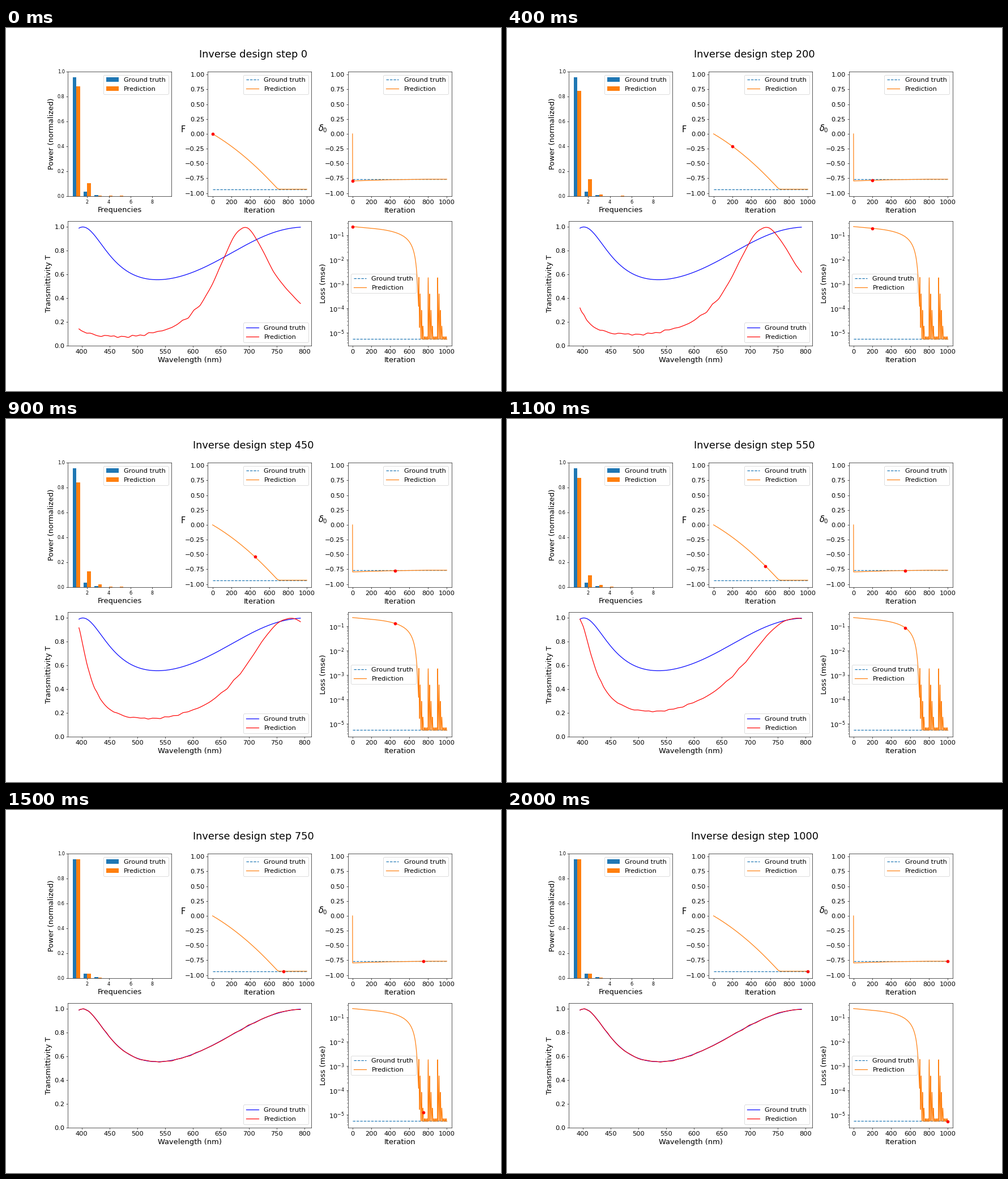
Recreate the animation shown at these times as a matplotlib script. Size 874x641 px, loop 2100 ms.

```python
import numpy as np
import matplotlib.pyplot as plt
from matplotlib.animation import FuncAnimation

DPI = 58.25
W, H = 874, 641
STEP = 50
F_TRUE, D_TRUE, L_TRUE = -0.9333, -0.765, 804
FLOOR = -5.29

wave = np.linspace(395, 793, 200)
freqs = np.arange(1, 10)
iters = np.arange(1001)

# Small model ripple, tied to the optical phase
phase = np.arange(.85, 2.08, .02)
ripple = np.random.default_rng(4).normal(0, .006, phase.size)


def finesse(s):
    """Accelerating descent that settles softly on the true value."""
    u = s / 1000
    f = -(.929 * u + .603 * u ** 2)
    return F_TRUE + .012 * np.logaddexp(0, (f - F_TRUE) / .012)


def length(s):
    return np.interp(s, [0, 200, 350, 450, 650, 720],
                     [692, 728, 764, 774, 792, L_TRUE])


def delta(s):
    return D_TRUE + (length(s) - L_TRUE) / 3900


def airy(f, l):
    return 1 / (1 + 12 * (1 + f) * np.sin(np.pi * l / wave) ** 2)


def predict(s):
    f, l = finesse(s), length(s)
    wobble = np.interp(l / wave, phase, ripple)
    return airy(f, l) + (.35 + .65 * (1 + f)) * wobble


def power(t):
    p = np.abs(np.fft.rfft(t)) ** 2
    return p[1:10] / p[1:].sum()


def ringing(s):
    """Damped bursts that restart every 100 iterations after 700."""
    t = (s - 1) % 100
    swing = np.maximum(2.62 - .0445 * t, .12)
    burst = swing * (.5 + .5 * np.cos(2 * np.pi * (t - 2) / 15))
    return 10 ** (FLOOR + .02 + np.where(s > 700, burst, 0))


truth = airy(F_TRUE, L_TRUE)
f_path = finesse(iters)
d_path = delta(iters)
d_path[0] = 0
error = airy(f_path[:, None], length(iters)[:, None]) - truth
loss = (error ** 2).mean(axis=1) + ringing(iters)

fig = plt.figure(figsize=((W + 1e-6) / DPI, (H + 1e-6) / DPI), dpi=DPI,
                 facecolor="white")
grid = fig.add_gridspec(2, 3, left=.125, right=.9, bottom=.125, top=.88,
                        wspace=.35, hspace=.2)
ax_bar, ax_f, ax_d = (fig.add_subplot(grid[0, i]) for i in range(3))
ax_t = fig.add_subplot(grid[1, :2])
ax_loss = fig.add_subplot(grid[1, 2])
title = fig.suptitle("", fontsize=22, y=.94)


def finish(ax, xlabel, ylabel, loc, **label):
    ax.set_xlabel(xlabel, fontsize=16)
    ax.set_ylabel(ylabel, **{"fontsize": 16, **label})
    ax.legend(loc=loc, fontsize=14)
    if ax is not ax_bar:
        ax.tick_params(labelsize=14)


def trace(ax, level, path):
    """Dashed goal, optimisation path and a moving dot."""
    ax.plot([0, 1000], [level, level], "--", color="C0", label="Ground truth")
    ax.plot(iters, path, color="C1", label="Prediction")
    ax.set(xlim=(-50, 1050), xticks=range(0, 1001, 200))
    return ax.plot([], [], "ro")[0]


# Spectrum bars
ax_bar.bar(freqs - .175, power(truth), .35, color="C0", label="Ground truth")
bars = ax_bar.bar(freqs + .175, power(predict(0)), .35, color="C1",
                  label="Prediction")
ax_bar.set(xlim=(.215, 9.785), ylim=(0, 1))
finish(ax_bar, "Frequencies", "Power (normalized)", "upper right")

# Parameter traces
dot_f = trace(ax_f, F_TRUE, f_path)
dot_d = trace(ax_d, D_TRUE, d_path)
for ax, name in ((ax_f, "F"), (ax_d, r"$\delta_0$")):
    ax.set_ylim(-1.05, 1.05)
    finish(ax, "Iteration", name, "upper right", rotation=0, fontsize=18)

# Transmission
ax_t.plot(wave, truth, "b", label="Ground truth")
pred_line, = ax_t.plot(wave, predict(0), "r", label="Prediction")
ax_t.set(xlim=(375.1, 812.9), ylim=(0, 1.05))
finish(ax_t, "Wavelength (nm)", "Transmittivity T", "lower right")

# Loss
dot_loss = trace(ax_loss, 10 ** -5.235, loss)
ax_loss.set_yscale("log")
ax_loss.set_ylim(10 ** -5.52, 10 ** -.42)
finish(ax_loss, "Iteration", "Loss (mse)", "center left")


def update(i):
    s = i * STEP
    title.set_text(f"Inverse design step {s}")
    t = predict(s)
    pred_line.set_ydata(t)
    for bar, h in zip(bars, power(t)):
        bar.set_height(h)
    dot_f.set_data([s], [f_path[s]])
    dot_d.set_data([s], [d_path[max(s, 1)]])
    dot_loss.set_data([s], [loss[s]])


anim = FuncAnimation(fig, update, frames=1000 // STEP + 1, interval=100,
                     init_func=lambda: [], repeat=True, repeat_delay=0)
plt.show()
```
